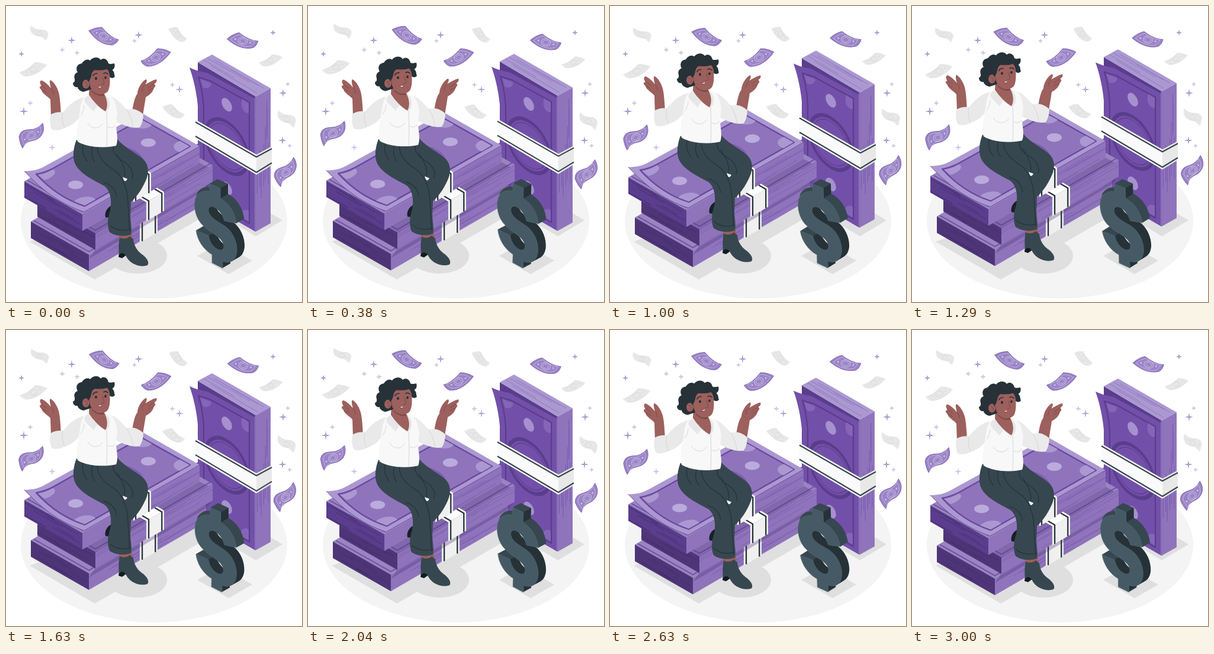
Animation, 500 px wide and 500 px high, one loop 3040 ms. Source, as an HTML page:

```html
<!DOCTYPE html>
<html>
<head>
<meta charset="utf-8">
<style>
  html, body { margin: 0; width: 100%; height: 100%; overflow: hidden; background: #fff; }
  svg { display: block; width: 100vw; height: 100vh; }
</style>
</head>
<body>
<svg id="stage" viewBox="0 0 500 500" fill="none" stroke-linecap="round" stroke-linejoin="round"></svg>
<script>
const LOOP = 3040;
const deep = '#5a3d8c', purple = '#7250a9', mid = '#8f74bc', light = '#ab98d1';
const ink = '#263238', slate = '#37474f', skin = '#9c605d', skinDark = '#7c4645';

let seed = 7;
const rnd = () => (seed = seed * 16807 % 2147483647) / 2147483647;
const fill = (d, color, extra = '') => `<path d="${d}" fill="${color}" ${extra}/>`;
const line = (d, color, width = 1, extra = '') =>
  `<path d="${d}" stroke="${color}" stroke-width="${width}" ${extra}/>`;
const poly = (points, color, extra = '') => `<polygon points="${points}" fill="${color}" ${extra}/>`;
const oval = (x, y, rx, ry, color, extra = '') =>
  `<ellipse cx="${x}" cy="${y}" rx="${rx}" ry="${ry}" fill="${color}" ${extra}/>`;

// Rosette and two discs of a 200 x 100 banknote
const rosette = (matrix, ring, disc) => `<g transform="matrix(${matrix})">
  <circle cx="100" cy="50" r="36.5" stroke="${ring}" stroke-width="5"/>
  <circle cx="100" cy="50" r="31" stroke="${ring}" stroke-width="1"/>
  <circle cx="38" cy="50" r="9" fill="${disc}"/><circle cx="162" cy="50" r="9" fill="${disc}"/></g>`;

// Short paper-edge lines on the face spanned from (x, y) by (dx, dy) and a height
function sheets(x, y, dx, dy, height, count, color) {
  let d = '';
  for (let i = 0; i < count; i++) {
    const a = rnd() * .7, b = Math.min(1, a + .2 + rnd() * .35), h = height * (.12 + .8 * rnd());
    d += `M${x + dx * a},${y + dy * a + h}L${x + dx * b},${y + dy * b + h}`;
  }
  return line(d, color, .8);
}

function brick(x, y, side) {
  return poly([x, y, x - 98, y - 56, x + 100, y - 171, x + 198, y - 115], '#9a84c2') +
    line(`M${x - 92},${y - 57}L${x},${y - 5}L${x + 196},${y - 119}`, '#7353a7', 2) +
    poly([x, y, x - 98, y - 56, x - 98, y - 28, x, y + 28], side) +
    poly([x, y, x + 198, y - 115, x + 198, y - 87, x, y + 28], mid) +
    sheets(x, y, -98, -56, 28, 8, '#432c6b') +
    sheets(x, y, 198, -115, 28, 8, '#7b5eae');
}

function band(x, y) {
  const at = f => [x + 198 * f, y - 115 * f - 2.5];
  const [ax, ay] = at(.434), [bx, by] = at(.586);
  const stripe = f => {
    const [sx, sy] = at(f);
    return line(`M${sx - 12},${sy - 7}L${sx},${sy}V${sy + 32}`, ink, 2.3, 'stroke-linecap="butt"');
  };
  return poly([ax, ay, ax - 12, ay - 7, bx - 12, by - 7, bx, by], '#fff') +
    poly([ax, ay, bx, by, bx, by + 32, ax, ay + 32], '#f0f0f0') + stripe(.455) + stripe(.567);
}

const folded = 'M-25,-9C-18,-13-11,-15-3,-15C5,-5 14,3 25,6C22,11 18,14 14,15C0,15-14,6-25,-9Z';
const waved = 'M-21,2C-18,-13-2,-9 4,-11C11,-13 15,-16 19,-21C23,-9 19,2 7,7C-2,10-9,8-15,21C-18,16-20,9-21,2Z';
function note(x, y, shape, transform, gray) {
  const [base, mark] = gray ? ['#e9e9e9', '#d9d9d9'] : ['#9a84c6', '#cdc1e4'];
  return `<g transform="translate(${x} ${y}) ${transform}">` + fill(shape, base) +
    (gray ? '' : line(shape, '#8467b6', 1)) +
    line(shape, mark, 1, 'transform="scale(.78)"') +
    `<g transform="rotate(${shape === folded ? 26 : -30})">` +
    oval(0, 0, 8, 6, base, `stroke="${mark}"`) + oval(0, 0, 5, 3.7, base, `stroke="${mark}" stroke-width=".8"`) +
    oval(-13, 0, 1.5, 1.5, mark) + oval(13, 0, 1.5, 1.5, mark) + '</g></g>';
}

const sparkle = (x, y, r, color = '#8b70ba') =>
  fill(`M${x},${y - r}l.9,${r - .9}l${r - .9},.9l${.9 - r},.9l-.9,${r - .9}l-.9,${.9 - r}l${.9 - r},-.9l${r - .9},-.9z`, color) +
  oval(x, y, .8, .8, '#fff');

function backdrop() {
  const pale = '#bcaedb', shade = '#dfdfdf';
  return oval(250, 363, 225, 131, '#f4f4f4') +
    poly('40,398 150,462 356,343 347,290', shade) + oval(222, 422, 50, 30, shade) +
    poly('370,358 422,389 467,362 430,340', shade) +
    poly('323,422 376,453 416,430 363,400', shade) +
    [[111, 58, 7], [224, 49, 7], [30, 178, 8], [468, 147, 7], [467, 227, 7], [26, 81, 5], [451, 45, 5],
     [95, 74, 5, pale], [120, 79, 5, pale], [217, 59, 4, pale], [41, 164, 5, pale], [78, 239, 6, pale],
     [281, 133, 5, pale], [293, 141, 7, '#9b84c6'], [476, 132, 4, pale], [479, 236, 4, pale]]
      .map(s => sparkle(...s)).join('');
}

function notes() {
  return [[165, 51, folded, ''], [253, 87, folded, 'scale(-1 1)'], [400, 59, folded, 'rotate(-13)'],
    [43, 219, waved, ''], [473, 281, waved, 'rotate(-15)'],
    [56, 46, waved, 'scale(-.75 .62)', 1], [46, 107, folded, 'scale(-.94 .82)', 1],
    [290, 48, folded, 'rotate(8) scale(.67 .8)', 1], [447, 92, folded, 'rotate(2) scale(-.8 .7)', 1],
    [283, 178, folded, 'scale(.77 .82)', 1], [474, 191, waved, 'scale(-.75 .73)', 1]]
    .map(n => note(...n)).join('');
}

function tower() {
  const sheet = 'M310,104C321,109 329,111 340,113L421,157V381L324,325V195C327,172 320,132 310,104Z';
  let grain = '';
  for (let i = 0; i < 9; i++) {
    const f = .1 + .8 * rnd(), x = 422 + 25 * f, y = 153 - 14 * f + rnd() * 130;
    grain += `M${x},${y}v${25 + rnd() * 70}`;
  }
  const stripe = (a, b, c) => line(`M320,${a}L423,${b}L449,${c}`, slate, 2.2, 'stroke-linecap="butt"');
  return poly('324,95 422,153 422,381 324,325', deep) +
    poly('324,95 348,82 447,139 422,153', light) +
    poly('422,153 447,139 447,367 422,381', mid) +
    line(grain, '#7759ab', 1) +
    line('M334,91L385,121M340,88L412,129M352,91L436,139M346,101L424,147M380,108L426,134', mid, .9) +
    fill(sheet, purple) +
    line('M325,120C332,123 337,124 344,126L411,163V367L334,322V190C335,167 331,140 325,120Z', deep, 2.2) +
    fill('M328,123L346,130C348,136 341,141 333,138ZM410,164V181C401,181 395,170 399,157ZM410,364V346C401,340 394,350 398,357Z', '#8465b7') +
    rosette('0 1.14 .98 .57 324 95', deep, '#a691ce') +
    line('M421,154V380', light, 1) +
    poly('320,192 423,251 423,285 320,224', '#fafafa') +
    poly('423,251 449,237 449,269 423,285', '#e8e8e8') +
    stripe(196, 255, 241) + stripe(220, 281, 265);
}

function stack() {
  return brick(140, 420, '#4e3577') + band(140, 420) +
    poly('151,411 348,296 338,310 140,427', '#442c6f', 'opacity=".3"') +
    brick(151, 384, '#4e3577') + poly('129,380 327,265 342,273 146,388', '#50347f', 'opacity=".35"') + band(151, 384) +
    brick(129, 352, deep) +
    fill('M31,279C43,279 53,277 63,272L229,181L327,237L132,348C88,333 57,307 31,279Z', light) +
    line('M31,279C57,307 88,333 132,348L327,237', deep, .8) +
    fill('M51,284C62,282 70,279 78,275L229,191L311,237L133,338C95,326 70,305 51,284Z', mid, `stroke="#6a479f" stroke-width="2.4"`) +
    fill('M54,285C66,284 74,279 79,276C88,280 80,290 65,294ZM115,330L133,337L151,327C145,319 124,321 115,330ZM293,247L310,237L294,228C280,232 280,242 293,247ZM213,200L229,192L246,201C240,209 221,209 213,200Z', light) +
    rosette('.99 -.575 .98 .56 31 296', '#7c5eaf', '#bbabdc') + band(129, 352);
}

function woman() {
  const shade = '#d6d6d6';
  return fill('M178,337C171,341 166,348 168,357L178,358Z', '#182126') +
    // ankle and boot
    fill('M191,382H212L215,398L192,396Z', skin) +
    fill('M192,410L190,424L196,426L203,421L202,410Z', '#111b20') +
    fill('M192,391C198,394 206,393 209,389L215,394C216,404 221,413 229,419C237,424 243,433 239,438C225,443 207,434 202,421C198,416 194,417 191,420C190,410 190,400 192,391Z', slate) +
    // trousers
    fill('M119,226C114,239 112,254 116,265C123,283 150,295 166,304C177,312 179,330 176,345C172,357 170,370 175,382C185,389 200,390 211,386C213,379 211,369 210,356L211,331C222,322 233,304 238,290C242,278 240,266 231,258C218,247 200,239 188,225C165,236 140,236 119,226Z', slate) +
    fill('M197,289L205,292C203,296 201,297 199,294Z', '#fff') +
    line('M130,234C128,247 131,255 137,262M146,237C143,250 145,257 150,264M154,238C155,255 166,267 181,276C193,283 202,300 205,320C207,340 207,360 209,380M182,236C178,246 187,257 199,263C210,270 217,282 213,291M187,250C198,266 203,278 200,288M176,371C186,379 199,380 210,377M165,298C178,302 185,309 187,322', ink, 1.2) +
    // arms
    fill('M76,188L75,158C70,152 61,148 60,142C55,138 57,135 60,135C56,130 57,125 61,126C67,129 72,134 76,139C74,132 73,127 75,125C81,128 87,138 89,146C91,153 92,166 93,185Z', skin) +
    line('M60,134L69,141M60,141L68,146M76,139C79,142 80,145 80,149', skinDark, .8) +
    fill('M213,179C215,164 218,153 222,148C222,139 230,127 236,124C239,124 238,129 235,133C242,129 248,125 254,124C256,127 253,130 250,132C254,133 252,137 250,138C248,146 243,150 236,154C235,162 233,172 231,186Z', skin) +
    line('M250,132L240,138M250,138L240,143M235,133C231,136 230,140 230,144', skinDark, .8) +
    // sleeves and blouse
    fill('M132,154C118,157 106,167 96,180C90,178 82,180 76,183C73,190 74,200 77,208C84,212 93,209 99,206C109,203 119,196 124,188Z', '#e9e9e9') +
    fill('M177,153C187,155 195,166 204,175L213,174C219,174 227,178 232,183C232,190 230,199 226,205C216,208 199,202 185,195Z', '#ebebeb') +
    line('M96,180C94,187 95,197 99,206M204,175C208,182 214,194 214,205', shade, 1) +
    fill('M132,154C125,162 125,180 122,195C119,210 119,222 121,229C138,240 170,240 186,236C189,230 188,219 187,212C185,200 187,190 188,180C186,168 184,158 177,153L165,149L141,151Z', '#f8f8f8') +
    fill('M139,151C133,154 131,159 134,164L148,178L154,169L169,180ZM165,149C174,153 177,163 174,173L169,180Z', '#e7e7e7') +
    fill('M141,132L140,150C147,161 158,172 168,178C173,169 171,157 165,147Z', skin) +
    fill('M144,143C151,151 159,153 166,151L165,147Z', skinDark) +
    line('M170,179C171,200 171,220 170,238M138,198C144,208 157,209 163,199M172,204C176,207 181,206 185,202M127,184C131,176 132,172 132,168', shade, 1) +
    head();
}

function head() {
  return fill('M131,145C125,144 121,140 121,137C116,138 113,134 113,130C117,128 116,126 116,123C114,118 117,113 121,112C117,105 120,98 128,97C132,91 137,89 142,92C147,86 156,85 160,91C166,86 172,91 173,97C177,99 180,97 183,97C185,103 182,107 179,108C184,111 182,115 184,119C181,123 177,122 174,119L146,140Z', ink) +
    oval(135, 132, 6, 7.5, skin) +
    fill('M141,130C138,115 150,105 160,104C169,103 174,108 175,116C176,125 176,138 172,144C168,149 159,151 153,148C146,145 142,139 141,130Z', skin) +
    fill('M138,128C145,125 143,113 148,108C157,109 168,109 173,105C177,108 176,115 177,119L181,104L160,95L136,110Z', ink) +
    line('M133,129C137,129 138,132 136,136M163,121C164,126 167,130 165,132C164,133 162,133 161,132', skinDark, 1) +
    line('M147,118C148,115 151,114 154,114M165,114C168,112 170,113 172,115', ink, 1.6) +
    oval(152, 122.5, 2, 2.4, ink) + oval(168, 121, 1.8, 2.3, ink) +
    fill('M155,136C157,137.5 159,137 160,135.5C161,138 158,140 155,136Z', '#fff') +
    line('M155,136.5C156,139 158,139.5 160,138', '#7b3038', .8);
}

function dollar() {
  const face = 'M344,300L362,308V325C378,334 387,350 389,367L369,363C366,352 358,342 350,339C343,337 340,343 343,350C347,359 358,364 370,372C384,382 391,400 390,415C388,431 378,436 366,431V443L348,434V420C333,411 323,395 321,379L342,388C344,399 351,409 360,412C368,414 370,406 366,399C360,388 345,383 333,371C322,361 317,344 319,330C321,317 330,311 344,313Z';
  let body = '';
  for (let i = 13; i > 0; i--) body += fill(face, ink, `transform="translate(${i} ${-i * .58})"`);
  return body + poly('344,300 357,292.5 375,300.5 362,308', slate) +
    poly('321,379 334,371.5 355,380.5 342,388', slate) +
    fill('M319,330C321,317 330,311 344,313V306C334,304 327,310 323,316Z', slate) +
    fill('M362,325L375,317.5C391,327 400,342 402,359.5L389,367C387,350 378,334 362,325Z', slate) +
    fill(face, '#455a64', 'stroke="#5b707a" stroke-width=".6"');
}

const group = (id, content) => `<g id="${id}">${content}</g>`;
const stage = document.getElementById('stage');
stage.innerHTML = backdrop() + group('notes', notes()) +
  group('lift', tower() + stack() + woman()) + group('dollar', dollar());
const part = id => document.getElementById(id);
const floating = part('notes'), lift = part('lift'), sign = part('dollar');

function draw(now) {
  const phase = now % LOOP / LOOP * 2 * Math.PI;
  const sway = Math.sin(2 * phase);
  lift.setAttribute('transform', `translate(0 ${-4.6 * (1 - Math.cos(phase))})`);
  floating.setAttribute('transform', `rotate(${sway} 256 170)`);
  sign.setAttribute('transform', `rotate(${2 * sway} 361 368)`);
  requestAnimationFrame(draw);
}
draw(performance.now());
</script>
</body>
</html>
```
